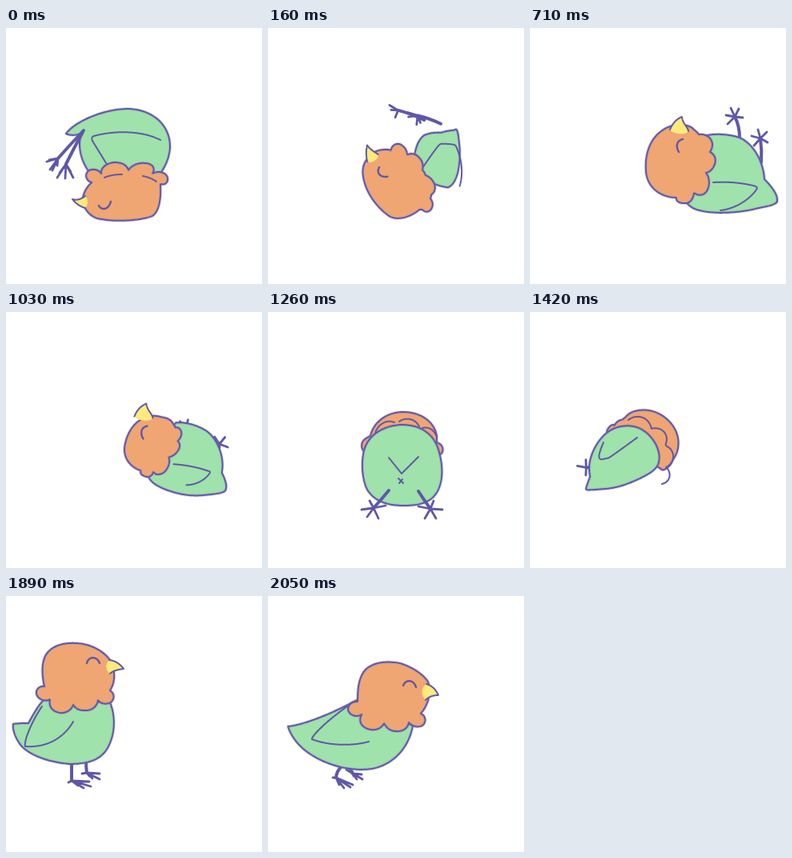
Write an HTML page that moves like this. It is 320 px wide and 320 px high and loops after 2130 ms.

```html
<!DOCTYPE html>
<html lang="en">
<head>
<meta charset="utf-8">
<title>Rolling bird</title>
<style>
  html, body { margin: 0; width: 100%; height: 100%; overflow: hidden; background: #fff; }
  svg { display: block; width: 100vw; height: 100vh; }
  g { visibility: hidden; }
  g.on { visibility: visible; }
  path { fill: none; stroke-linecap: round; stroke-linejoin: round; }
  .line { stroke: #5f58a8; stroke-width: 2; }
  .soft { stroke: #8d7fc0; stroke-width: 4; stroke-opacity: .28; }
  .leg { stroke: #5f58a8; stroke-width: 4; }
  .toe { stroke: #5f58a8; stroke-width: 2.8; }
  .eye { stroke: #5f58a8; stroke-width: 2.4; }
  .body { fill: #9fe2ab; }
  .head { fill: #f0a673; }
  .beak { fill: #fdea7b; }
</style>
</head>
<body>
<svg id="stage" viewBox="0 0 320 320"></svg>
<script>
const LOOP = 2130;

// Outlines run clockwise: the body from the tail tip, the head from the throat.
// A leg is hip, bend, ankle, then toe ends.
const poses = {
  tuck: {
    mid: [148, 172], legsFront: true,
    body: 'M75 132 C86 117 122 101 153 101 C184 102 206 122 205 150 C204 163 199 173 193 182 L104 180 C95 168 92 155 92 145 C92 140 93 136 94 132 C88 134 80 135 75 132 Z',
    head: 'M107 193 C99 191 98 181 104 178 C110 175 117 178 119 182 C118 174 127 168 137 168 C145 168 152 172 153 178 C157 171 166 168 175 169 C184 170 187 176 183 182 C190 178 200 180 202 187 C203 193 199 197 193 195 C194 212 192 229 183 235 C168 241 135 243 114 238 C102 234 95 222 96 212 C98 203 102 198 107 193 Z',
    bill: 'M99 210 C95 213 90 216 83 214 C87 219 92 223 99 225', gape: 'C103 221 103 214 99 210 Z',
    eye: 'M116 222 C119 228 128 228 131 217',
    wing: 'M193 140 C170 128 135 128 110 135 C107 136 107 138 108 141 C114 151 121 162 127 172',
    folds: ['M123 187 Q132 183 145 183', 'M171 185 Q181 187 188 192'],
    legs: [
      [97, 128, 80, 146, 65, 163, 51, 167, 55, 177, 58, 178, 64, 172, 54, 165],
      [96, 130, 85, 150, 75, 170, 64, 187, 74, 188, 84, 187, 81, 180, 67, 181]
    ]
  },
  land: {
    mid: [230, 175],
    body: 'M311 220 C308 224 296 224 284 226 C262 230 232 232 214 228 C204 226 198 220 196 214 L222 134 C234 130 252 131 264 136 C282 144 294 168 295 189 C303 197 312 208 312 216 C312 218 312 219 311 220 Z',
    head: 'M217 133 C225 132 231 136 231 143 C232 148 231 152 229 155 C235 157 238 163 236 169 C235 176 230 180 224 181 C229 187 229 197 224 204 C220 210 212 210 207 206 C206 213 202 220 194 219 C187 219 184 214 186 208 C170 208 153 199 151 178 C148 156 156 137 170 127 C176 122 182 120 187 120 C195 119 204 120 210 125 C214 128 216 130 217 133 Z',
    bill: 'M203 128 C203 122 201 114 201 109 C195 113 191 117 186 125', gape: 'C188 133 202 133 203 128 Z',
    eye: 'M196 138 C188 139 185 147 192 154',
    wing: 'M240 226 C258 225 274 216 284 203 C286 200 285 199 280 198 C265 194 248 193 232 193',
    legs: [
      [266, 138, 268, 122, 264, 109, 260, 99, 270, 100, 274, 114, 256, 118, 254, 107],
      [291, 170, 297, 155, 296, 139, 297, 128, 306, 137, 304, 148, 289, 148, 287, 134]
    ]
  },
  rest: {
    mid: [226, 176],
    body: 'M309 217 C306 222 294 223 282 226 C262 231 230 233 212 228 C202 226 196 220 193 214 L218 135 C232 131 250 133 262 137 C280 145 292 168 293 189 C301 197 308 206 309 213 Z',
    head: 'M211 133 C220 132 227 137 228 145 C228 149 227 152 225 155 C231 158 233 164 231 170 C229 176 225 180 220 181 C225 187 225 197 221 204 C217 210 210 210 205 206 C204 214 200 220 192 219 C186 219 182 216 183 212 C165 212 147 201 145 180 C143 158 150 139 164 129 C169 125 174 123 179 122 C188 120 199 121 204 126 C207 129 210 131 211 133 Z',
    bill: 'M198 129 C197 123 191 120 190 111 C185 113 179 117 175 127', gape: 'C178 133 196 134 198 129 Z',
    eye: 'M191 139 C183 141 182 148 186 155',
    wing: 'M238 228 C256 226 274 215 283 202 C285 199 283 198 279 197 C262 193 245 192 229 193',
    legs: [
      [262, 138, 262, 122, 256, 111, 251, 100, 261, 101, 266, 112, 247, 120, 245, 109],
      [289, 168, 290, 153, 288, 138, 285, 127, 296, 130, 297, 143, 280, 147, 277, 135]
    ]
  },
  rear: {
    mid: [168, 190], headBehind: true, legsFront: true,
    body: 'M170 242 C150 242 133 237 124 222 C117 208 116 185 121 170 C128 150 150 141 168 141 C190 141 207 152 213 172 C219 192 219 208 213 222 C206 237 192 242 170 242 Z',
    head: 'M213 178 L121 186 C121 182 121 178 121 175 C116 172 116 163 120 160 C123 157 126 156 128 155 C131 140 146 125 169 125 C191 125 208 137 211 155 C211 158 211 160 211 163 C217 165 220 170 218 175 C217 178 215 178 213 178 Z',
    wing: 'M188 181 L167 202 L151 182',
    folds: ['M134 151 C138 140 148 134 158 138', 'M164 137 C172 131 184 133 189 143', 'M193 145 C200 143 207 147 210 154'],
    marks: ['M163 208 L169 214', 'M168 209 L164 214'],
    legs: [
      [151, 223, 142, 234, 132, 245, 117, 247, 127, 236, 147, 242, 138, 258, 124, 256],
      [188, 224, 195, 235, 203, 246, 188, 243, 207, 236, 218, 247, 210, 258, 196, 258]
    ]
  },
  flop: {
    mid: [100, 170], headBehind: true,
    body: 'M16 210 C23 202 32 196 40 189 C44 170 58 148 80 138 C100 130 125 136 135 152 C145 167 147 190 139 202 C133 212 122 214 108 214 C80 214 45 210 20 212 C17 212 16 211 16 210 Z',
    head: 'M140 208 L82 136 C80 129 86 123 92 123 C96 123 99 125 99 128 C103 124 107 122 112 122 C117 114 127 113 136 115 C160 119 178 142 177 165 C176 186 162 201 140 208 Z',
    wing: 'M105 144 C88 155 68 169 50 178 C47 178 46 176 47 172 C50 166 54 160 60 153',
    folds: ['M99 128 C110 119 126 125 128 139 C141 135 152 147 145 160 C157 163 160 181 146 187 C154 193 152 206 141 208'],
    legs: [[42, 181, 40, 173, 37, 167, 28, 163, 39, 157, 45, 169, 33, 175, 34, 160]]
  },
  stand: {
    mid: [85, 135],
    body: 'M9 160 C15 159 22 159 28 159 C33 150 40 137 47 130 L130 133 C137 150 137 172 127 190 C118 206 100 210 80 210 C55 208 30 200 18 186 C11 176 8 167 9 160 Z',
    head: 'M130 118 C136 122 136 129 131 133 C126 136 118 135 115 130 C114 139 106 144 97 143 C91 143 86 140 84 136 C82 143 74 147 67 146 C58 144 53 139 55 129 C49 133 39 129 38 122 C37 116 43 112 48 113 C45 100 44 86 49 75 C56 62 72 58 88 59 C107 60 122 69 130 80 C136 90 138 106 130 118 Z',
    bill: 'M130 97 C134 93 141 92 147 91 C142 84 136 81 129 80', gape: 'C124 84 124 93 130 97 Z',
    eye: 'M117 84 C114 75 103 75 101 84',
    wing: 'M84 157 C72 178 50 190 24 188 C22 180 34 154 45 138',
    legs: [
      [82, 209, 82, 220, 82, 231, 104, 232, 106, 238, 97, 240, 90, 237, 78, 233],
      [100, 206, 100, 214, 101, 221, 117, 222, 117, 229, 108, 228, 104, 225, 95, 222]
    ]
  },
  leap: {
    mid: [125, 150],
    body: 'M25 163 C45 161 80 147 111 130 L181 162 C177 186 160 210 130 216 C95 221 55 205 37 184 C31 177 27 170 25 163 Z',
    head: 'M191 147 C198 150 198 158 193 162 C187 165 180 163 176 158 C175 166 167 170 160 169 C153 169 148 165 145 159 C142 166 134 168 128 167 C118 165 112 158 117 148 C110 153 100 148 100 141 C101 134 106 132 112 132 C112 117 113 103 121 93 C131 82 150 81 165 84 C181 89 194 98 200 107 C204 118 202 134 191 147 Z',
    bill: 'M197 130 C202 125 208 124 213 124 C210 117 205 112 198 110', gape: 'C191 115 191 124 197 130 Z',
    eye: 'M185 114 C182 104 172 104 169 112',
    wing: 'M126 182 C105 188 75 187 55 179 C54 176 70 158 106 133',
    legs: [
      [91, 214, 86, 219, 85, 227, 106, 236, 103, 239, 95, 240, 89, 236, 81, 227],
      [101, 214, 104, 217, 106, 222, 117, 223, 118, 229, 111, 229, 107, 225, 98, 217]
    ]
  }
};

// start, pose, next pose, share of next, turn in degrees, options
const steps = [
  [0, 'tuck'],
  [80, 'tuck', 'land', .27, 90],
  [160, 'tuck', 'land', .55, 90],
  [240, 'tuck', 'land', .84, 90],
  [320, 'land'],
  [390, 'land', 'rest', .45, 0],
  [470, 'land', 'rest', .85, 0],
  [550, 'rest', 'rest', 0, 0, { kick: 6 }],
  [630, 'rest', 'rest', 0, 0, { kick: -2 }],
  [710, 'rest'],
  [1030, 'rest', 'rear', .25, 0],
  [1110, 'rest', 'rear', .52, 0],
  [1180, 'rest', 'rear', .8, 0],
  [1260, 'rear'],
  [1340, 'rear', 'flop', .35, 0],
  [1420, 'rear', 'flop', .65, 0],
  [1500, 'rear', 'flop', .87, 0],
  [1580, 'flop'],
  [1660, 'flop', 'stand', .3, -50],
  [1740, 'flop', 'stand', .62, -50],
  [1820, 'flop', 'stand', .9, -50, { dx: -5 }],
  [1890, 'stand'],
  [1970, 'stand', 'leap', .5, 0],
  [2050, 'leap']
];

const NS = 'http://www.w3.org/2000/svg';
const probe = document.createElementNS(NS, 'path');

function trace(d, n = 200) {
  probe.setAttribute('d', d);
  const len = probe.getTotalLength();
  return Array.from({ length: n + 1 }, (_, i) => {
    const p = probe.getPointAtLength(len * i / n);
    return [p.x, p.y];
  });
}

const pairs = list => list.flatMap((v, i) => i % 2 ? [] : [[v, list[i + 1]]]);
const lerp = (p, q, k) => [p[0] + (q[0] - p[0]) * k, p[1] + (q[1] - p[1]) * k];
const xy = p => p[0].toFixed(2) + ' ' + p[1].toFixed(2);
const poly = pts => 'M' + pts.map(xy).join('L');
const path = (cls, d) => `<path class="${cls}" d="${d}"/>`;

function spin([x, y], deg) {
  const a = deg * Math.PI / 180, c = Math.cos(a), s = Math.sin(a);
  return [x * c - y * s, x * s + y * c];
}

function bird(a, b, k, turn, { kick = 0, dx = 0 } = {}) {
  const lead = k < .5 ? a : b;
  const [mx, my] = lerp(a.mid, b.mid, k);

  // Mix two outlines in a turning frame; a missing one leaves the other rigid.
  function blend(pa, pb) {
    const ua = pa && pa.map(p => [p[0] - a.mid[0], p[1] - a.mid[1]]);
    const ub = pb && pb.map(p => spin([p[0] - b.mid[0], p[1] - b.mid[1]], -turn));
    const mix = ua && ub ? ua.map((p, i) => lerp(p, ub[i], k)) : ua || ub;
    return mix.map(p => {
      const [x, y] = spin(p, k * turn);
      return [x + mx + dx, y + my];
    });
  }

  function part(get, read = trace) {
    if (!get(lead)) return null;
    const da = get(a), db = get(b);
    return blend(da && read(da), db && read(db));
  }

  const solo = d => lead === a ? blend(trace(d, 40), null) : blend(null, trace(d, 40));
  const lines = list => (list || []).map(d => path('line', poly(solo(d)))).join('');
  const shape = (cls, pts) => {
    const d = poly(pts) + 'Z';
    return path(cls + ' soft', d) + path('line', d);
  };

  function leg(i) {
    const pts = part(p => p.legs[i], pairs);
    if (!pts) return '';
    const [hip, bend, ankle, ...toes] =
      pts.map(([x, y], j) => [x + kick * Math.min(j, 2) / 2, y]);
    return path('leg', `M${xy(hip)}Q${xy(bend)} ${xy(ankle)}`) +
      path('toe', toes.map(t => `M${xy(ankle)}L${xy(t)}`).join(''));
  }

  const legs = leg(0) + leg(1);
  const body = shape('body', part(p => p.body)) +
    path('line', poly(part(p => p.wing))) + lines(lead.marks);
  let head = shape('head', part(p => p.head)) + lines(lead.folds);
  if (lead.bill) {
    head += path('beak', poly(part(p => p.bill && p.bill + p.gape)) + 'Z') +
      path('line', poly(part(p => p.bill))) +
      path('eye', poly(part(p => p.eye)));
  }
  const torso = lead.headBehind ? head + body : body + (lead.legsFront ? legs : '') + head;
  if (!lead.legsFront) return legs + torso;
  return lead.headBehind ? torso + legs : torso;
}

const stage = document.getElementById('stage');
stage.innerHTML = steps.map(([, a, b = a, k = 0, turn = 0, opts]) =>
  `<g>${bird(poses[a], poses[b], k, turn, opts)}</g>`).join('');

const cels = [...stage.children];
const start = performance.now();
let shown = -1;

function play() {
  const t = (performance.now() - start) % LOOP;
  const now = steps.findLastIndex(s => s[0] <= t);
  if (now !== shown) {
    cels.forEach((g, i) => g.classList.toggle('on', i === now));
    shown = now;
  }
  requestAnimationFrame(play);
}
play();
</script>
</body>
</html>
```
